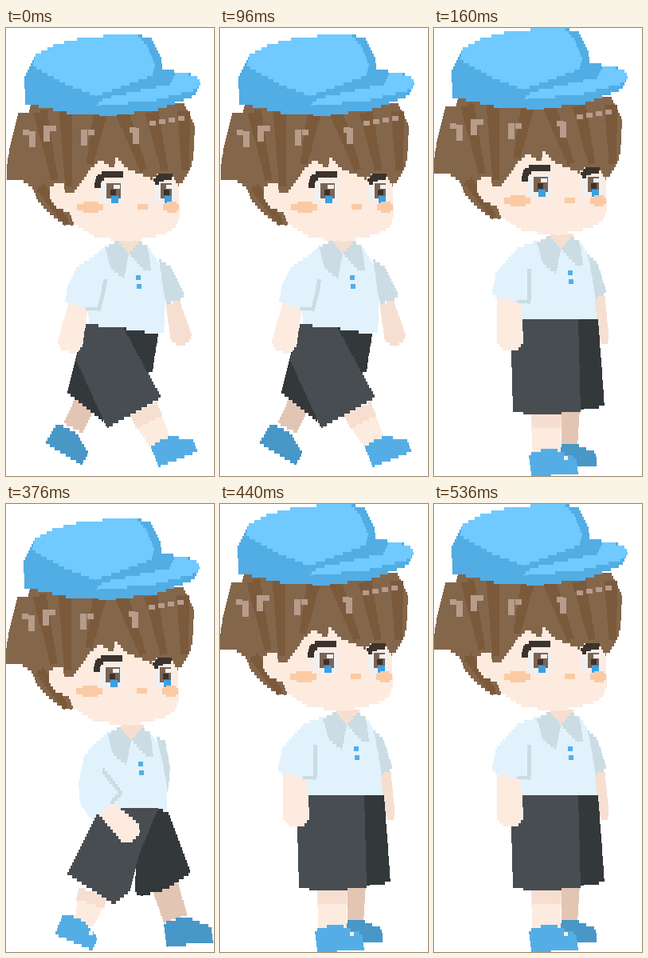
An HTML page with a canvas for the animation above (0.6 s loop, 261 by 560 pixels).

```html
<!DOCTYPE html>
<html>
<head>
<meta charset="utf-8">
<style>
html, body { margin: 0; width: 100%; height: 100%; overflow: hidden; background: #fff; }
canvas { display: block; }
</style>
</head>
<body>
<canvas id="stage" width="261" height="560"></canvas>
<script>
const ctx = document.getElementById('stage').getContext('2d');
const STEP = 4;
const C = {
  cap: '#70c9ff', capShade: '#51ade4', hair: '#84664b', hairShade: '#7b5a3c', shine: '#b79c8b',
  skin: '#fdebe0', skinShade: '#f6dfd1', skinDark: '#e3c5b4', blush: '#fbcaa5', lash: '#3c332d',
  white: '#f1f0f1', iris: '#7a6353', blue: '#3d9fe0', shirt: '#e1f2fd', fold: '#cbdce4',
  shorts: '#484d52', shortsDark: '#33383b', shoe: '#54aee5', shoeDark: '#4897c7'
};

function rect(color, x, y, w, h) {
  ctx.fillStyle = color;
  ctx.fillRect(Math.round(x), Math.round(y), w, h);
}

// Fills a polygon in stair-stepped rows with hard edges.
function poly(color, ...p) {
  const n = p.length, ys = p.filter((_, i) => i % 2).map(Math.round);
  const top = Math.min(...ys), bottom = Math.max(...ys);
  for (let y = top; y < bottom; y += STEP) {
    const h = Math.min(STEP, bottom - y), mid = y + h / 2, xs = [];
    for (let i = 0; i < n; i += 2) {
      const x1 = p[i], y1 = p[i + 1], x2 = p[(i + 2) % n], y2 = p[(i + 3) % n];
      if ((y1 <= mid) !== (y2 <= mid)) xs.push(Math.round(x1 + (mid - y1) * (x2 - x1) / (y2 - y1)));
    }
    xs.sort((a, b) => a - b);
    for (let i = 0; i + 1 < xs.length; i += 2) rect(color, xs[i], y, xs[i + 1] - xs[i], h);
  }
}

// A tapered bar from one point to another, with an optional rounded tip.
function limb(color, x1, y1, w1, x2, y2, w2, tip = 0) {
  const len = Math.hypot(x2 - x1, y2 - y1), ux = (x2 - x1) / len, uy = (y2 - y1) / len;
  const side = (x, y, r) => [x - uy * r, y + ux * r];
  const ex = x2 + ux * tip, ey = y2 + uy * tip;
  poly(color, ...side(x1, y1, w1 / 2), ...side(x2, y2, w2 / 2), ...side(ex, ey, w2 / 4),
    ...side(ex, ey, -w2 / 4), ...side(x2, y2, -w2 / 2), ...side(x1, y1, -w1 / 2));
}

function line(color, w, ...p) {
  for (let i = 0; i + 3 < p.length; i += 2) limb(color, p[i], p[i + 1], w, p[i + 2], p[i + 3], w, w / 2);
}

const arm = (color, ...ends) => limb(color, ...ends, 9);

function leg(x1, y1, w1, x2, y2, w2) {
  limb(C.skin, x1, y1, w1, x2, y2, w2, 4);
  limb(C.skinShade, x1, y1, w1, x1 + (x2 - x1) * .4, y1 + (y2 - y1) * .4, w1 * .95);
}

function shoe(color, x, y, degrees, size) {
  const a = degrees * Math.PI / 180, c = Math.cos(a) * size, s = Math.sin(a) * size;
  const turn = (u, v) => [x + u * c - v * s, y + u * s + v * c];
  poly(color, ...turn(0, 2), ...turn(12, -2), ...turn(30, -3), ...turn(44, 4),
    ...turn(56, 9), ...turn(57, 27), ...turn(2, 30));
  return turn(41, 6);
}

function frontShoe(x, y, degrees, size) {
  const [gx, gy] = shoe(C.shoe, x, y, degrees, size);
  rect(C.white, gx, gy, 5, 5);
}

function eye(x, w) {
  rect(C.white, x - 8, 185, w + 12, 26);
  rect(C.iris, x, 186, w, 19);
  rect(C.lash, x + w * .3, 194, 7, 7);
  rect(C.white, x + w * .5, 188, 8, 5);
  rect(C.blue, x + w * .35, 202, 9, 9);
}

function face() {
  poly(C.skin, 54,191, 66,184, 100,150, 214,150, 217,228, 211,242, 196,250, 156,259, 112,254,
    84,236, 79,224, 62,216, 54,206);
  eye(125, 18);
  eye(193, 14);
  line(C.lash, 8, 114,192, 115,181, 123,175, 142,175);
  line(C.lash, 8, 186,186, 190,180, 204,178);
  for (const [x, w] of [[88, 33], [196, 20]]) {
    rect(C.blush, x, 212, w, 8);
    rect(C.blush, x + w / 4, 209, w * .6 | 0, 14);
  }
  rect(C.blush, 164, 212, 13, 7);
}

function fringe() {
  poly(C.hair, 40,96, 222,90, 232,165, 219,187, 213,187, 207,174, 189,175, 182,181, 150,167, 137,152,
    134,168, 118,157, 106,167, 84,198, 73,198, 72,187, 62,185, 54,191);
  for (const [x, endX, endY] of [[42, 60, 182], [74, 78, 190], [118, 104, 162], [144, 172, 170], [182, 198, 170], [222, 224, 170]])
    limb(C.hairShade, x, 96, 17, endX, endY, 9);
  for (const [x, y, dx] of [[28, 121, -8], [46, 114, 8], [93, 119, 9], [158, 117, -4]]) {
    rect(C.shine, x, y, 8, 20);
    rect(C.shine, x + dx, y + (dx < 0 ? dx / 4 : 0), 8, 7);
  }
  for (let x = 179; x < 216; x += 12) rect(C.shine, x, 108 - (x - 179) / 6, 8, 6);
}

function cap() {
  const crown = [36,26, 60,13, 100,3, 163,0];
  poly(C.capShade, ...crown, 181,5, 194,30, 195,43, 236,51, 244,60, 235,77, 190,94, 130,102,
    75,98, 23,86, 22,54);
  poly(C.cap, ...crown, 176,14, 186,38, 182,52, 112,77, 75,63, 33,40);
  poly(C.cap, 111,89, 122,80, 205,62, 212,48, 236,51, 244,60, 238,69, 180,84);
}

function head(x, y) {
  ctx.save();
  ctx.translate(x, y);
  poly(C.hair, 30,86, 222,86, 236,115, 234,155, 219,187, 82,239, 67,235, 52,222, 39,208, 33,193,
    20,183, 0,180, 0,164, 5,135, 14,98, 28,97);
  limb(C.hairShade, 42, 190, 13, 76, 237, 8);
  face();
  fringe();
  cap();
  ctx.restore();
}

// Torso without sleeves; x, y is the middle of the collar.
function torso(x, y) {
  ctx.save();
  ctx.translate(x, y);
  poly(C.shirt, -29,-7, -52,15, -50,102, 44,102, 46,60, 40,18, 25,-5);
  poly(C.skinShade, -13,-16, 16,-16, 13,-2, 0,3, -12,-2);
  poly(C.fold, -30,-4, -14,-13, 0,3, -6,34, -22,22);
  poly(C.fold, 0,3, 14,-12, 24,-5, 28,24, 20,24);
  rect(C.shoe, 9, 30, 6, 6);
  rect(C.shoe, 10, 41, 6, 6);
  ctx.restore();
}

function strideOut() {
  torso(154, 279);
  limb(C.skinDark, 100, 468, 28, 84, 500, 27);
  shoe(C.shoeDark, 64, 494, 34, .96);
  leg(172, 476, 38, 193, 517, 28);
  shoe(C.shoe, 181, 522, -18, .95);
  arm(C.skinShade, 209, 343, 18, 220, 387, 27);
  poly(C.fold, 192,289, 207,299, 223,332, 222,338, 201,345, 197,325);
  poly(C.shortsDark, 140,374, 191,383, 184,428, 165,430);
  poly(C.shortsDark, 90,405, 77,456, 122,492, 120,440);
  poly(C.shorts, 100,370, 148,376, 195,462, 127,500, 88,415);
  arm(C.skin, 91, 346, 25, 80, 396, 32);
  poly(C.shirt, 125,275, 88,300, 78,320, 74,341, 101,351, 118,354, 126,314);
  line(C.fold, 5, 125,315, 117,351, 102,351);
  head(1, 8);
}

function passing() {
  torso(159, 273);
  limb(C.skinDark, 171, 475, 24, 170, 525, 20);
  shoe(C.shoeDark, 150, 524, -2, .94);
  leg(141, 480, 38, 141, 530, 36);
  frontShoe(119, 531, -3, 1.06);
  arm(C.skinShade, 208, 336, 13, 213, 386, 13);
  poly(C.fold, 193,283, 205,294, 217,331, 203,338, 198,310);
  poly(C.shortsDark, 180,364, 206,364, 214,473, 184,477);
  poly(C.shorts, 110,364, 181,364, 184,478, 150,483, 99,481, 97,403);
  arm(C.skin, 94, 336, 30, 96, 394, 33);
  poly(C.shirt, 130,266, 105,275, 78,305, 72,335, 104,342, 119,345, 121,300);
  line(C.fold, 5, 120,301, 119,342, 106,342);
  head(0, 0);
}

function strideIn() {
  torso(157, 292);
  limb(C.skinDark, 199, 476, 33, 213, 519, 31);
  shoe(C.shoeDark, 198, 522, -3, 1.06);
  leg(110, 485, 38, 99, 522, 26);
  frontShoe(72, 512, 26, .93);
  poly(C.fold, 189,291, 200,297, 206,330, 203,362, 200,340);
  poly(C.shortsDark, 185,381, 203,384, 232,461, 200,482, 170,490, 162,486, 163,440);
  poly(C.shorts, 114,389, 150,380, 191,381, 166,440, 155,484, 135,500, 77,462);
  arm(C.skin, 120, 375, 22, 156, 411, 31);
  poly(C.shirt, 128,284, 98,315, 91,350, 93,375, 104,391, 118,387, 146,362, 125,325);
  line(C.fold, 5, 121,332, 144,361, 134,372);
  head(0, 18);
}

let shown;
function frame(now) {
  const t = now % 600;
  const pose = t < 160 ? strideOut : t >= 280 && t < 440 ? strideIn : passing;
  if (pose !== shown) {
    ctx.clearRect(0, 0, 261, 560);
    pose();
    shown = pose;
  }
  requestAnimationFrame(frame);
}
frame(0);
</script>
</body>
</html>
```
